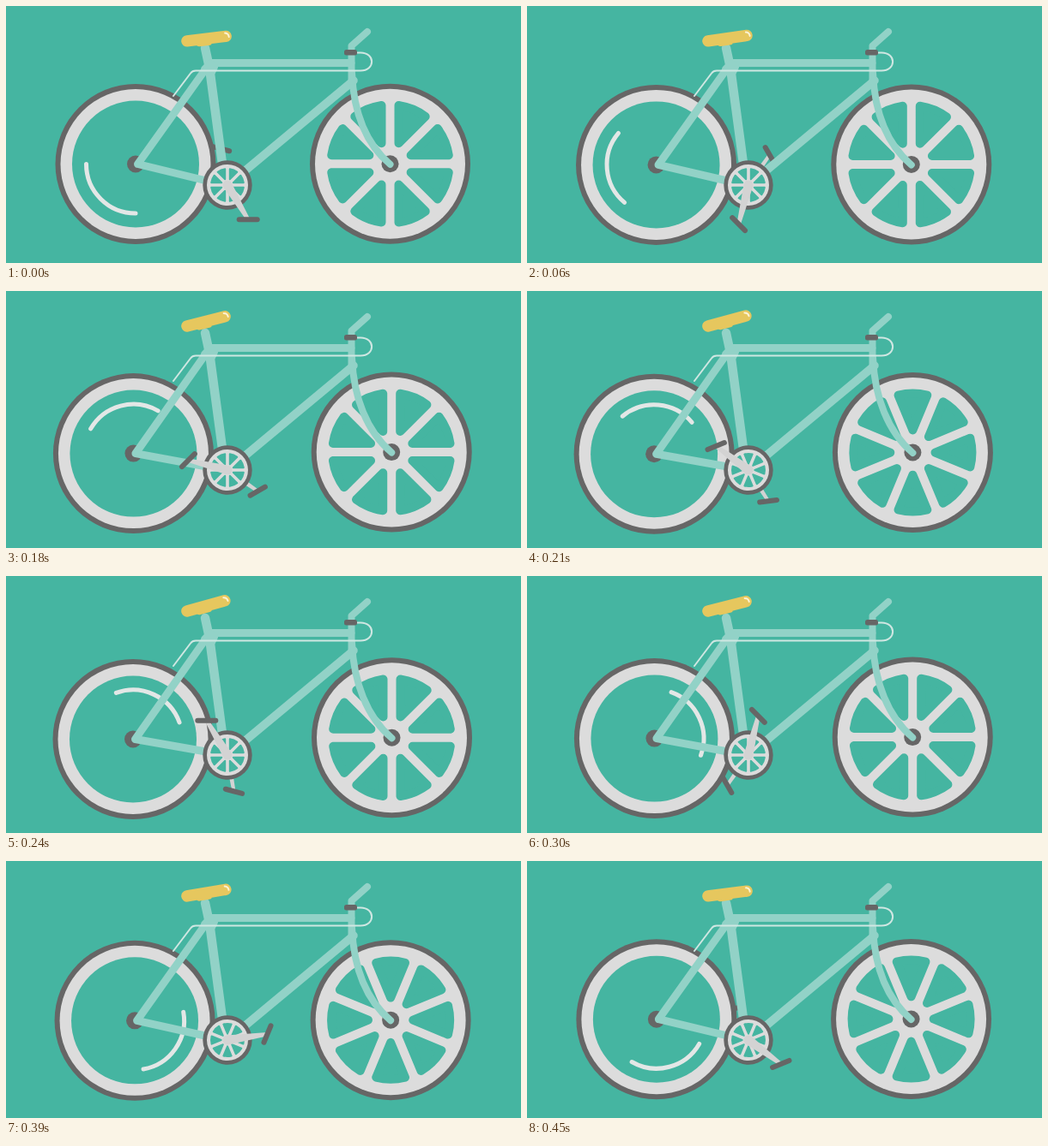
Recreate the animation shown at these times as an HTML page. Size 600 px wide and 300 px high, loop 480 ms.

```html
<!DOCTYPE html>
<html lang="en">
<head>
<meta charset="utf-8">
<title>Bicycle</title>
<style>
  html, body { margin: 0; width: 100%; height: 100%; overflow: hidden; background: #45b5a1; }
  svg { display: block; width: 100vw; height: 100vh; }
  .bg { fill: #45b5a1; }
  .dark { fill: #666; }
  .light { fill: #dcdcdc; }
  .hole { fill: #45b5a1; stroke: #45b5a1; stroke-linejoin: round; }
  .tube { fill: none; stroke: #92d2c7; stroke-linecap: round; stroke-linejoin: round; }
  .pedal { stroke: #666; stroke-width: 6; stroke-linecap: round; }
  .crank { fill: #d3d3d3; }
  .cable { fill: none; stroke: #cfe7e2; stroke-width: 2; stroke-linecap: round; }
  .shine { fill: none; stroke: #e3e7e6; stroke-width: 5; stroke-linecap: round; }
  .seat { fill: #e6c75e; }
  .glint { fill: none; stroke: #fbf3d4; stroke-width: 2; stroke-linecap: round; }
</style>
</head>
<body>
<svg viewBox="0 0 600 300">
  <rect class="bg" width="600" height="300"/>

  <g id="backCrank">
    <path class="crank" d="M0 -3 L43 -2 V2 L0 3Z" transform="rotate(260)"/>
    <g id="backPedal"><path class="pedal" d="M-10 0 H10"/></g>
  </g>

  <g id="rear">
    <circle class="dark" r="93.5"/>
    <circle class="light" r="87.5"/>
    <circle class="bg" r="74"/>
    <path id="shine" class="shine" d="M0 57.5 A57.5 57.5 0 0 1 -57.5 0"/>
    <circle class="dark" r="10"/>
  </g>

  <g id="front">
    <circle class="dark" r="93.5"/>
    <circle class="light" r="87.5"/>
    <g id="spokes"></g>
    <circle class="dark" r="10"/>
  </g>

  <path class="tube" d="M232 49 L236.5 70" stroke-width="10.5" stroke-linecap="butt"/>
  <path class="tube" d="M238 66.5 H402" stroke-width="9"/>
  <path class="tube" d="M237 72 L252 184" stroke-width="10.5"/>
  <path class="tube" d="M262 206 L405 87" stroke-width="9.5"/>
  <path id="stays" class="tube" stroke-width="9"/>
  <path class="tube" d="M232 74 L238 68 L242 71 L239 77Z" stroke-width="10"/>
  <path id="fork" class="tube" stroke-width="8"/>
  <path class="tube" d="M402.5 88 V46.5 L421 30" stroke-width="8"/>
  <path class="cable" d="M408 54.5 H413 C430.5 54.5 430.5 75.5 413 75.5 H221 Q217 75.5 215 78.5 L195 105"/>
  <rect class="dark" x="394" y="51" width="15" height="6.5" rx="2.5"/>

  <g id="seat">
    <path class="seat" d="M10 0 H28 V6 Q28 8 26 8 H14 Q10 8 10 4Z"/>
    <rect class="seat" x="-6.8" y="-6.8" width="59" height="13.4" rx="6.7"/>
    <path class="glint" d="M45 -4 Q49 -3 49 1"/>
  </g>

  <g id="ring">
    <circle class="dark" r="28.7"/>
    <circle class="light" r="24"/>
    <g id="ringHoles"></g>
    <g transform="rotate(59)"><path class="crank" d="M0 -5.5 A5.5 5.5 0 0 0 0 5.5 L47 2.2 V-2.2Z"/></g>
    <g id="frontPedal"><path class="pedal" d="M-10.5 0 H10.5"/></g>
  </g>
</svg>
<script>
const LOOP = 480, STEP = 30, RAD = Math.PI / 180;
const el = id => document.getElementById(id);
const place = (id, x, y, a = 0) =>
  el(id).setAttribute('transform', `translate(${x} ${y}) rotate(${a})`);
const polar = (r, a) => [r * Math.cos(a), r * Math.sin(a)];

// Eight rounded gaps between spokes: rim radius, spoke width, corner radius.
function cutHoles(id, rim, width, corner) {
  const inset = width / 2 + corner, r = rim - corner;
  const edge = Math.asin(inset / r), apex = inset / Math.sin(22.5 * RAD);
  const p = polar(apex, 22.5 * RAD), q = polar(r, edge), s = polar(r, 45 * RAD - edge);
  let out = '';
  for (let i = 0; i < 8; i++) {
    out += `<path class="hole" stroke-width="${corner * 2}" transform="rotate(${i * 45})"
      d="M${p} L${q} A${r} ${r} 0 0 1 ${s}Z"/>`;
  }
  el(id).innerHTML = out;
}

cutHoles('spokes', 74, 10, 5);
cutHoles('ringHoles', 20, 3.6, 1);

const [bx, by] = polar(43, 260 * RAD);
place('backPedal', bx, by, 15);
const [fx, fy] = polar(47, 59 * RAD);
place('frontPedal', fx, fy);

function draw(ms) {
  const n = Math.floor(ms % LOOP / STEP);
  const turn = n * 22.5, c = Math.cos(turn * RAD);
  const rx = 149.5 + 1.5 * c, ry = 187.5 - 3 * c;
  const wx = 448.5 - c, wy = 186.5 - 2.2 * c;

  place('rear', rx, ry);
  place('shine', 0, 0, n * 20);
  place('front', wx, wy);
  place('spokes', 0, 0, turn);
  place('backCrank', 258, 209, turn);
  place('ring', 258, 209, turn);
  place('seat', 211, 41, -11.2 + 4.2 * c);

  el('stays').setAttribute('d', `M233 73 L${rx + 2.5} ${ry} L250 208`);
  el('fork').setAttribute('d',
    `M403 78 C405 124 ${wx - 29} ${wy - 24} ${wx} ${wy + 0.5}`);
}

function tick() {
  draw(performance.now());
  requestAnimationFrame(tick);
}
tick();
</script>
</body>
</html>
```
